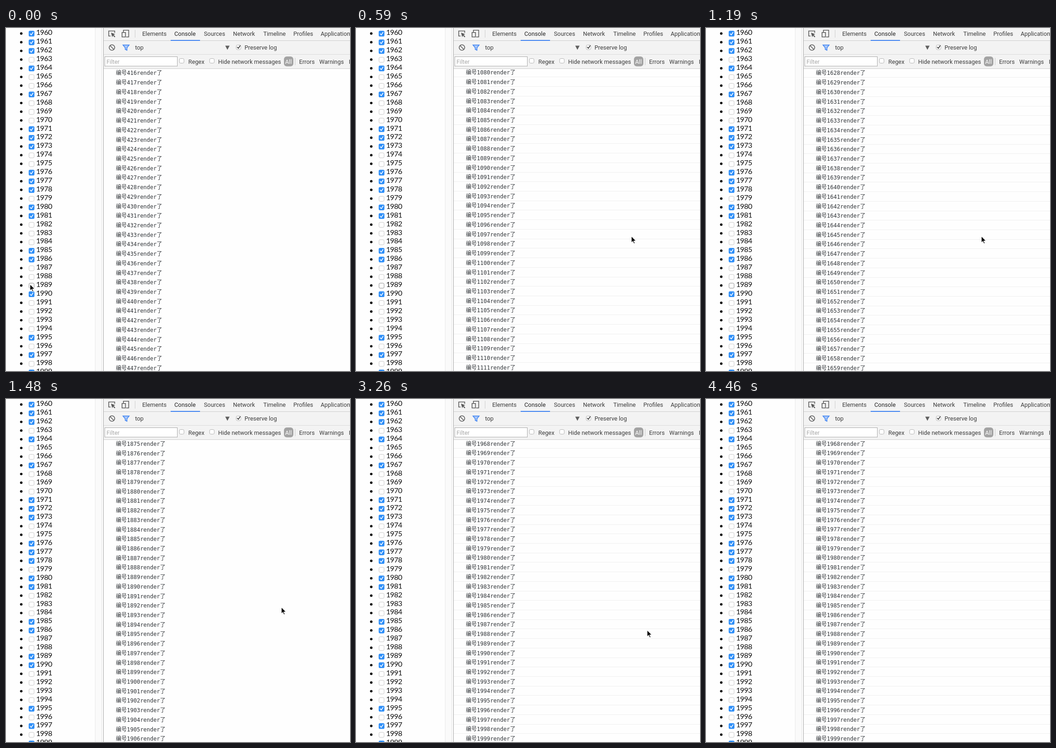
These frames come from a looping animation (750 px wide and 747 px high, 5.04 s). An HTML page:

```html
<!DOCTYPE html>
<html lang="zh-CN">
<head>
<meta charset="utf-8">
<title>Checkbox list and console</title>
<style>
  html, body { margin: 0; width: 100%; height: 100%; overflow: hidden; background: #fff; }
  svg { display: block; width: 750px; height: 747px; }
  .year { font: 16px Lato, sans-serif; letter-spacing: -.6px; fill: #111; }
  .ui { font: 12.8px Roboto, sans-serif; fill: #3c3c3c; }
  .log { font: 12px "DejaVu Sans Mono", "Noto Sans CJK SC", "Noto Sans CJK", monospace; fill: #303438; }
  .icon { fill: none; stroke: #5a5a5a; stroke-width: 1.6; }
  .tick { fill: none; stroke-width: 1.6; stroke-linecap: round; stroke-linejoin: round; }
</style>
</head>
<body>
<svg id="stage" viewBox="0 0 750 747">
  <rect width="750" height="747" fill="#fefefe"/>
  <rect x="195" width="14" height="747" fill="#fafafa"/>
  <rect x="194" width="1" height="747" fill="#e7e7e7"/>
  <rect x="208" width="1" height="747" fill="#e7e7e7"/>
  <rect x="209" width="3" height="747" fill="#fafafa"/>
  <g id="years"></g>

  <g id="logs"></g>
  <rect x="213" width="537" height="88" fill="#f3f3f3"/>
  <g fill="#cdcdcd">
    <rect x="213" y="27" width="537" height="1"/>
    <rect x="213" y="57" width="537" height="1" fill="#dadada"/>
    <rect x="213" y="88" width="537" height="1"/>
    <rect x="281" y="4" width="1" height="17"/>
    <rect x="630" y="65" width="1" height="16"/>
  </g>
  <rect x="212" width="1" height="747" fill="#a6a6a6"/>
  <rect x="359" y="26" width="64" height="2" fill="#3e82f1"/>

  <path class="icon" d="M228 17.5h-4v-11h13v4"/>
  <path d="M229 10l9 3.6-3.4 1.5 3.7 3.7-1.5 1.5-3.7-3.7-1.5 3.3z" fill="#5a5a5a"/>
  <path class="icon" d="M256 9V4.8h11.5v14.7H262M253 9.8h7.5v9.7H253z"/>
  <circle class="icon" cx="231" cy="42.5" r="6"/>
  <path class="icon" d="M226.8 38.3l8.4 8.4"/>
  <path d="M255 37h13.5l-4.8 6v5.5l-3.8-2V43z" fill="#a9c8fa" stroke="#3e82f1" stroke-width="1.5"/>
  <path d="M478 38.5h9.5l-4.75 9z" fill="#606060"/>

  <rect x="215.5" y="62.5" width="158" height="20.5" fill="#fff" stroke="#a8a8a8"/>
  <rect x="606" y="62" width="20.5" height="21.5" rx="6" fill="#a3a3a3"/>
  <g id="labels"></g>
  <g id="smallBoxes"></g>
  <path class="tick" d="M504.3 41.8l2.2 2.5 4-5.8" stroke="#333"/>

  <path id="cursor" d="M.8.8v14.4l3.3-3.1 2.3 5.1 2.3-1-2.3-5h4.6z"
        fill="#000" stroke="#fff" stroke-width="1.1" stroke-linejoin="round"/>
</svg>
<script>
const LOOP = 5040, ROWS = 32, ROW_PITCH = 20.72, YEAR_PITCH = 18.92;
const FOCUS_YEAR = 1989, CHECK_AT = 1480;
const checkedYears = new Set([1960, 1961, 1962, 1964, 1967, 1971, 1972, 1973, 1976, 1977,
  1978, 1980, 1981, 1985, 1986, 1990, 1995, 1997, 1999]);

// [time, first visible number, vertical scroll remainder, row lines visible]
const scrolls = [
  [0, 416, .49, 0], [150, 590, .49, 0], [440, 935, -.23, 1], [590, 1080, -.6, 1],
  [740, 1223, -.23, 1], [890, 1366, .49, 1], [1040, 1498, .49, 1], [1190, 1628, .49, 1],
  [1330, 1750, .05, 1], [1480, 1875, .05, 0], [1630, 1968, -.23, 1]
];
// [time, x, y]; no position means hidden
const pointer = [
  [0, 51.5, 557], [150, 229, 530], [300, 602, 456], [440, 599.5, 452.5], [2380, 596.5, 452.5],
  [2670, 596, 456], [2820, 596, 467], [2960, 605, 487], [3110, 612, 498], [3260, 634, 502.5],
  [4160, 647, 540], [4310, 712, 714], [4460]
];

const byId = id => document.getElementById(id);
function add(parent, tag, attrs, text = '') {
  const node = document.createElementNS('http://www.w3.org/2000/svg', tag);
  for (const key in attrs) node.setAttribute(key, attrs[key]);
  node.textContent = text;
  return parent.appendChild(node);
}
const current = (steps, time) => steps.findLast(step => step[0] <= time);

function addCheckbox(parent, x, y, size, border) {
  add(parent, 'rect', { x, y, width: size, height: size, rx: 2.5, fill: '#fff', stroke: border });
}
function addChecked(parent, y) {
  const group = add(parent, 'g', {});
  add(group, 'rect', { x: 49.5, y: y - 6, width: 12.5, height: 12.5, rx: 2.8, fill: '#2f8ff8' });
  add(group, 'path', { class: 'tick', d: `M52.8 ${y + .5}l2.3 2.6 3.9-5.8`, stroke: '#fff' });
  return group;
}

let focusCheck;
for (let year = 1960; year < 2000; year++) {
  const y = 12 + (year - 1960) * YEAR_PITCH, list = byId('years');
  add(list, 'circle', { cx: 33.3, cy: y, r: 2.7 });
  add(list, 'text', { class: 'year', x: 65.7, y: y + 3.4 }, year);
  if (checkedYears.has(year)) addChecked(list, y);
  else addCheckbox(list, 50.2, y - 5, 11, year === FOCUS_YEAR ? '#8c8c8c' : '#c6c6c6');
  if (year === FOCUS_YEAR) focusCheck = addChecked(list, y);
}

[['Elements', 297, 17], ['Console', 367, 17, '#222'], ['Sources', 431.5, 17], ['Network', 495, 17],
 ['Timeline', 561, 17], ['Profiles', 626.5, 17], ['Application', 686, 17], ['top', 281.5, 47],
 ['Preserve log', 520, 47], ['Filter', 219, 77.5, '#a9a9a9'], ['Regex', 397.5, 77.5],
 ['Hide network messages', 462.5, 77.5], ['All', 608.5, 77.5, '#fff'], ['Errors', 639, 77.5],
 ['Warnings', 683, 77.5], ['Info', 747.5, 77.5]
].forEach(([text, x, y, color = '#3c3c3c']) =>
  add(byId('labels'), 'text', { class: 'ui', x, y, style: `fill:${color}` }, text));

[[502, 37], [378, 66.5], [444, 66.5]].forEach(([x, y]) =>
  addCheckbox(byId('smallBoxes'), x, y, 10, '#b2b2b2'));

const rows = Array.from({ length: ROWS }, () => ({
  line: add(byId('logs'), 'rect', { x: 213, width: 537, height: 1, fill: '#efefef' }),
  text: add(byId('logs'), 'text', { class: 'log', x: 239.5 })
}));

let shownScroll;
function showLog(scroll) {
  if (scroll === shownScroll) return;
  shownScroll = scroll;
  const [, first, offset, lined] = scroll;
  rows.forEach(({ line, text }, i) => {
    const y = Math.round(102 + offset + i * ROW_PITCH);
    text.textContent = `编号${first + i}render了`;
    text.setAttribute('y', y);
    line.setAttribute('y', y + 5);
    line.setAttribute('opacity', lined);
  });
}

function draw(now) {
  const time = now % LOOP, [, x, y] = current(pointer, time);
  showLog(current(scrolls, time));
  focusCheck.setAttribute('visibility', time >= CHECK_AT ? 'visible' : 'hidden');
  byId('cursor').setAttribute('visibility', x === undefined ? 'hidden' : 'visible');
  if (x !== undefined) byId('cursor').setAttribute('transform', `translate(${x} ${y})`);
}

const start = performance.now();
function tick() {
  draw(performance.now() - start);
  requestAnimationFrame(tick);
}
tick();
</script>
</body>
</html>
```
